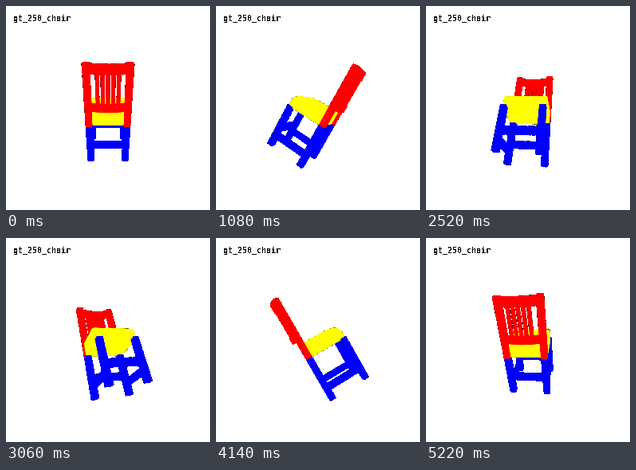
Write a matplotlib script that moves like this. It is 256 by 256 pixels and loops after 5400 ms.

```python
import numpy as np
import matplotlib.pyplot as plt
from matplotlib.animation import FuncAnimation

SIZE, FRAMES, INTERVAL = 256, 30, 180
CX, CY = 128, 129.4
TILT = np.radians(30)
DIST = 250.0      # camera distance, one unit is one pixel at the centre
RADIUS = 1.35     # splat radius in pixels
RED, YELLOW, BLUE = (255, 0, 0), (255, 255, 0), (0, 0, 255)

rng = np.random.default_rng(250)


def box(*spans, step=1.05):
    """Jittered points on the six faces of a box given as (low, high) spans."""
    faces = []
    for axis in range(3):
        i, j = [k for k in range(3) if k != axis]
        grid = []
        for lo, hi in (spans[i], spans[j]):
            n = max(2, int(round((hi - lo) / step)) + 1)
            grid.append(np.linspace(lo, hi, n))
        a, b = (g.ravel() for g in np.meshgrid(*grid))
        for side in spans[axis]:
            p = np.empty((a.size, 3))
            p[:, axis] = side
            for k, v in ((i, a), (j, b)):
                jitter = rng.uniform(-0.45, 0.45, a.size)
                p[:, k] = np.clip(v + jitter, *spans[k])
            faces.append(p)
    return np.vstack(faces)


def bow(p, depth=5.0):
    """Bend a part of the backrest backwards in the middle."""
    p[:, 2] -= depth * (1 - (p[:, 0] / 25.5) ** 2)
    return p


def round_front(p):
    """Round the front edge and the front corners of the seat."""
    t = np.clip((p[:, 2] - 17) / 10, 0, 1) ** 2
    h = np.clip((p[:, 1] + 10) / 15.5, 0, 1)
    p[:, 1] -= 7 * t * h
    p[:, 0] *= 1 - 0.14 * t
    return p


def build_chair():
    """Axes: width, height along the backrest, depth towards the front."""
    parts = []

    def add(p, color):
        parts.append((p, np.tile(color, (len(p), 1))))

    for lo, hi in ((-25.5, -19.5), (19.5, 25.5)):
        add(box((lo, hi), (-10, 64.5), (-23.5, -17.5)), RED)
        add(box((lo, hi), (-64, -10.5), (-23.5, -17.5)), BLUE)
        add(box((lo, hi), (-63.5, -10.5), (22, 27.5)), BLUE)
        mid = (lo + hi) / 2
        add(box((mid - 2, mid + 2), (-53, -47), (-17.5, 22)), BLUE)
    for d in (-20.5, 24.5):
        add(box((-19.5, 19.5), (-43.5, -36.5), (d - 2, d + 2)), BLUE)

    add(bow(box((-25.5, 25.5), (56, 65), (-23.5, -20))), RED)
    add(bow(box((-20, 20), (12.5, 20), (-23.5, -20))), RED)
    for w in np.linspace(-11.2, 11.2, 5):
        add(bow(box((w - 1.2, w + 1.2), (20, 56), (-22.5, -20.5))), RED)

    add(round_front(box((-25, 25), (-10, 5.5), (-20, 27))), YELLOW)
    points, colors = zip(*parts)
    return np.vstack(points), np.vstack(colors) / 255


POINTS, COLORS = build_chair()


def project(angle):
    w, u, d = POINTS.T
    y = u * np.cos(TILT) + d * np.sin(TILT)
    z = u * np.sin(TILT) - d * np.cos(TILT)
    x = w * np.cos(angle) + z * np.sin(angle)
    near = z * np.cos(angle) - w * np.sin(angle)
    s = DIST / (DIST - near)
    return CX + x * s, CY - y * s, near


def render(frame):
    """Splat the points and blend them front to back in every pixel."""
    x, y, near = project(2 * np.pi * frame / FRAMES)
    order = np.argsort(-near)
    x, y, color = x[order], y[order], COLORS[order]
    off = np.arange(-1, 2)
    dx, dy = (g.ravel() for g in np.meshgrid(off, off))
    col = np.floor(x)[:, None].astype(int) + dx
    row = np.floor(y)[:, None].astype(int) + dy
    dist2 = (col + 0.5 - x[:, None]) ** 2 + (row + 0.5 - y[:, None]) ** 2
    alpha = 1 - dist2 / RADIUS ** 2
    hit = alpha > 0.12
    pixel = (row * SIZE + col)[hit]
    alpha = np.minimum(alpha[hit], 0.99)
    owner = np.nonzero(hit)[0]

    order = np.argsort(pixel, kind="stable")
    pixel, alpha, owner = pixel[order], alpha[order], owner[order]
    fade = np.log(1 - alpha)
    before = np.cumsum(fade) - fade
    first = np.r_[True, pixel[1:] != pixel[:-1]]
    start = before[first][np.cumsum(first) - 1]
    weight = alpha * np.exp(before - start)

    image = np.ones((SIZE * SIZE, 3))
    used = pixel[first]
    for c in range(3):
        total = np.bincount(pixel, weight * color[owner, c], SIZE * SIZE)
        image[used, c] = total[used]
    return np.clip(image, 0, 1).reshape(SIZE, SIZE, 3)


fig = plt.figure(figsize=(SIZE / 100, SIZE / 100), dpi=100, facecolor="white")
ax = fig.add_axes([0, 0, 1, 1])
ax.axis("off")
view = ax.imshow(render(0), interpolation="nearest", aspect="auto",
                 extent=(0, SIZE, SIZE, 0))
ax.text(10, 19, "gt_250_chair", family="DejaVu Sans Mono", weight="bold",
        size=7.2, color="black", va="baseline", antialiased=False)


def update(frame):
    view.set_data(render(frame))
    return [view]


anim = FuncAnimation(fig, update, frames=FRAMES, interval=INTERVAL,
                     repeat=True, repeat_delay=0, blit=False)
plt.show()
```
